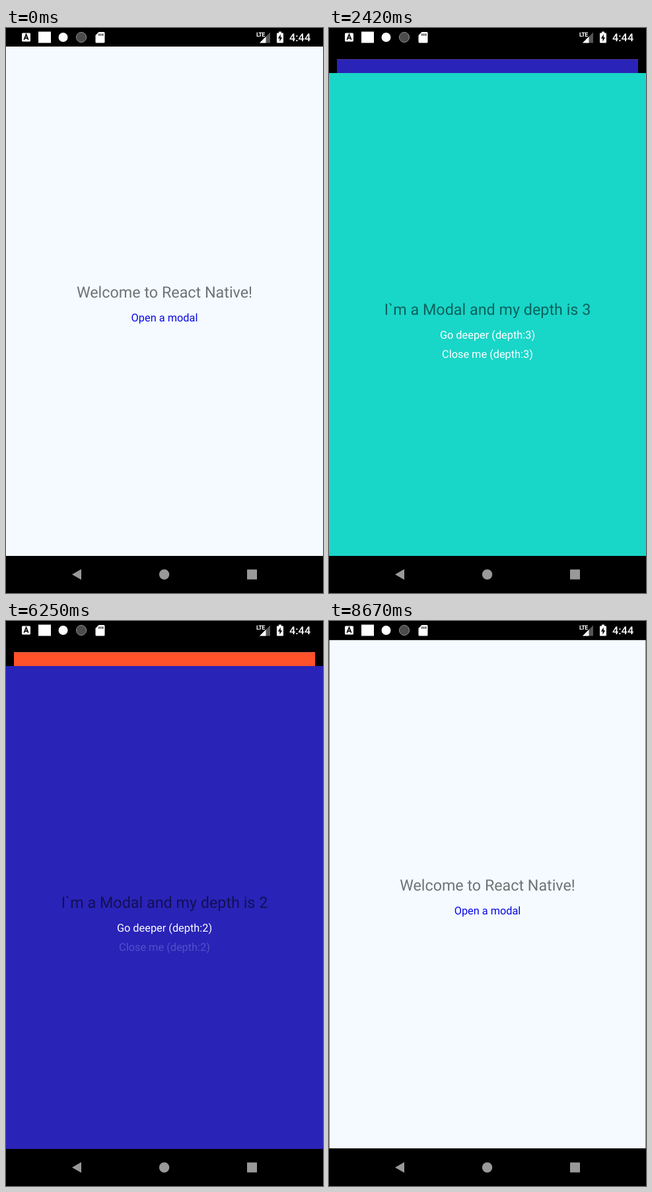
These frames come from a looping animation (480x853 px, 8.75 s). An HTML page:

```html
<!DOCTYPE html>
<html lang="en">
<head>
<meta charset="utf-8">
<title>Stacked modals</title>
<style>
  html, body { margin: 0; width: 100%; height: 100%; overflow: hidden; background: #000; }
  svg { display: block; width: 100%; height: 100%; }
  text { font-family: Roboto, sans-serif; text-rendering: geometricPrecision; }
  .title { font-size: 23.33px; text-anchor: middle; fill: #000; fill-opacity: .54; }
  .link { font-size: 16.33px; text-anchor: middle; }
</style>
</head>
<body>
<svg viewBox="0 0 480 853">
  <rect width="480" height="853"/>
  <g id="cards"></g>

  <g id="status" fill="#fff">
    <rect width="480" height="28" fill="#000"/>
    <rect x="24" y="7.5" width="13" height="13" rx="1.5"/>
    <path d="M27.3 17.8 30.5 9.8 33.7 17.8M28.6 15.3h3.8" fill="none" stroke="#000" stroke-width="1.7"/>
    <rect x="49" y="5.5" width="19" height="17"/>
    <circle cx="86.5" cy="14" r="7"/>
    <circle cx="114" cy="14" r="7.6" fill="#4c4c4c" stroke="#8c8c8c"/>
    <path d="M115 6.9a7.2 7.2 0 0 1 6 9a7.6 7.6 0 0 0-6-9z" fill="#aaa"/>
    <path d="M140.5 6H148a1.5 1.5 0 0 1 1.5 1.5v13.500a1.500 1.500 0 0 1-1.500 1.500H137a1.500 1.500 0 0 1-1.500-1.500V11z"/>
    <path d="M141 8.500v3.300M143.800 8.500v3.300M146.600 8.500v3.300" stroke="#000" stroke-width="1.300"/>
    <text x="379" y="13.400" font-size="9" font-weight="700" letter-spacing="-.6">LTE</text>
    <path d="M400 6.500V22.500H384z" fill="#555"/>
    <path d="M393.500 13V22.500H384z"/>
    <path d="M413 5.500h4v2h2a1 1 0 0 1 1 1v13a1 1 0 0 1-1 1h-8a1 1 0 0 1-1-1v-13a1 1 0 0 1 1-1h2z"/>
    <path d="M415.800 9.500 411.900 15.800H414.400V20.500L418.200 14.200H415.800z" fill="#000"/>
    <text x="429" y="20.300" font-size="16.330" font-weight="500">4:44</text>
  </g>

  <g id="navigation" fill="#999">
    <rect y="797" width="480" height="56" fill="#000"/>
    <path d="M100 825 114 817V833z"/>
    <circle cx="239.600" cy="825" r="7.700"/>
    <rect x="365" y="817.500" width="15" height="15"/>
  </g>
</svg>
<script>
const LOOP = 8750, FPS = 12;
const SLIDE = 320, PRESS_HOLD = 85, RELEASE = 250;
const AREA = { top: 28, height: 769, midX: 240, midY: 412.5 };
const BACK_SCALE = 0.95, BACK_LIFT = 38;

const clamp = x => Math.max(0, Math.min(1, x));

// Ease-in along a cubic Bezier (0.42, 0, 1, 1), mirrored for the second half.
function easeIn(x) {
  let lo = 0, hi = 1;
  for (let i = 0; i < 30; i++) {
    const s = (lo + hi) / 2, bend = 3 * s * s - 2 * s ** 3;
    if (1.26 * s * (1 - s) ** 2 + bend < x) lo = s; else hi = s;
  }
  return 3 * lo * lo - 2 * lo ** 3;
}
function easeInOut(x) {
  x = clamp(x);
  if (x === 0 || x === 1) return x;
  return x < 0.5 ? easeIn(2 * x) / 2 : 1 - easeIn(2 - 2 * x) / 2;
}

const opening = (card, press, start = press + 52) =>
  ({ card, press, start, step: 1, link: cards[card - 1].links[0] });
const closing = (card, press) =>
  ({ card, press, start: press + 52, step: -1, link: cards[card].links[1] });

function add(parent, tag, attrs, text = '') {
  const node = document.createElementNS('http://www.w3.org/2000/svg', tag);
  for (const key in attrs) node.setAttribute(key, attrs[key]);
  node.textContent = text;
  return parent.appendChild(node);
}

function makeCard(color, top, titleY, title, linkColor, labels) {
  const group = add(document.getElementById('cards'), 'g', {});
  add(group, 'rect', { y: top, width: 480, height: 797 - top, fill: color });
  add(group, 'text', { class: 'title', x: 240, y: titleY }, title);
  const links = labels.map((label, i) => add(group, 'text',
    { class: 'link', x: 240, y: titleY + 36 + 28.4 * i, fill: linkColor }, label));
  return { group, links };
}

const cards = [
  makeCard('#f4faff', 28, 407.4, 'Welcome to React Native!', '#0808e4', ['Open a modal']),
  ...['#ff512a', '#2923b8', '#18d6c8'].map((color, i) =>
    makeCard(color, 68, 433.4, `I\`m a Modal and my depth is ${i + 1}`, '#fff',
      [`Go deeper (depth:${i + 1})`, `Close me (depth:${i + 1})`]))
];

const moves = [
  opening(1, 1, 10), opening(2, 500), opening(3, 2000),
  closing(3, 4166), closing(2, 6250), closing(1, 8333)
];

function shown(card, t) {
  if (card === 0) return 1;
  return moves.filter(m => m.card === card)
    .reduce((sum, m) => sum + m.step * easeInOut((t - m.start) / SLIDE), 0);
}

function linkOpacity(link, t) {
  const move = moves.find(m => m.link === link && t >= m.press);
  return move ? 0.2 + 0.8 * easeInOut((t - move.press - PRESS_HOLD) / RELEASE) : 1;
}

function draw(t) {
  cards.forEach(({ group, links }, i) => {
    const visible = shown(i, t), pushed = shown(i + 1, t);
    const scale = 1 - (1 - BACK_SCALE) * pushed;
    const y = AREA.height * (1 - visible) - (i ? BACK_LIFT * pushed : 0);
    group.setAttribute('transform',
      `translate(${AREA.midX} ${AREA.midY + y}) scale(${scale}) translate(${-AREA.midX} ${-AREA.midY})`);
    group.setAttribute('visibility', visible > 0.0001 ? 'visible' : 'hidden');
    links.forEach(link => link.setAttribute('opacity', linkOpacity(link, t)));
  });
}

// The screen refreshes 12 times a second, on whole hundredths.
function tick() {
  const t = performance.now() % LOOP;
  const step = Math.floor(Math.floor(t / 10) * FPS / 100);
  draw(step * 1000 / FPS);
  requestAnimationFrame(tick);
}
tick();
</script>
</body>
</html>
```
